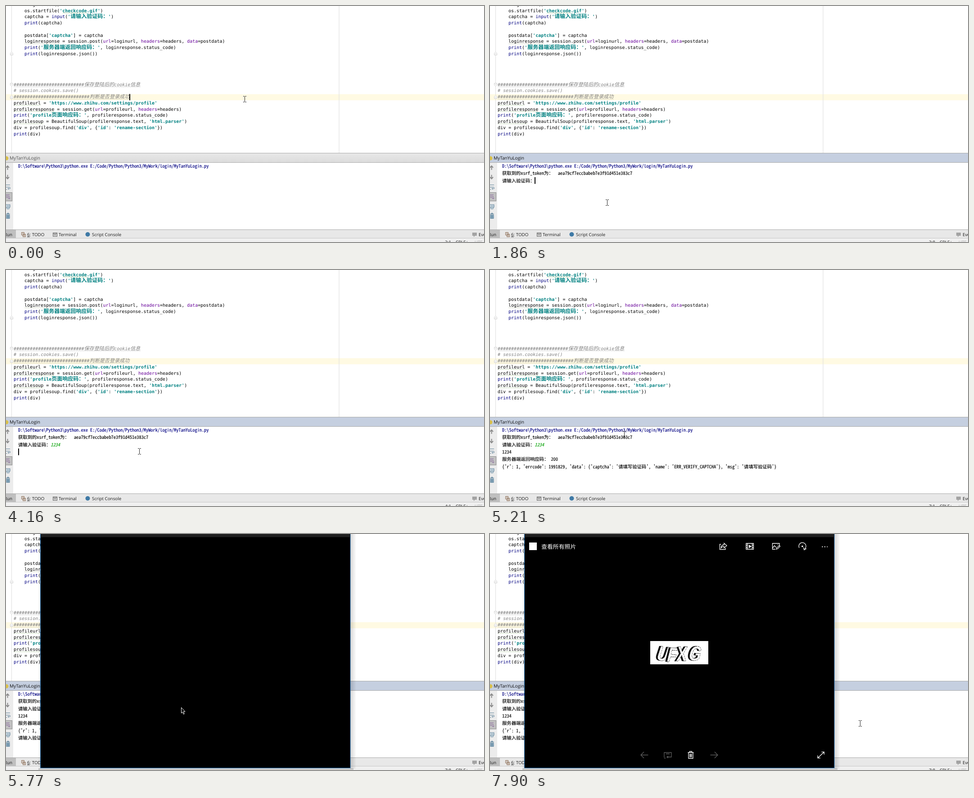
Write an HTML page that moves like this. It is 1062x527 px and loops after 8000 ms.

```html
<!DOCTYPE html>
<html lang="zh">
<head>
<meta charset="utf-8">
<title>Login run</title>
<style>
html, body { margin: 0; width: 100%; height: 100%; overflow: hidden; background: #fff; }
svg { display: block; width: 1062px; height: 527px; }
text { white-space: pre; text-rendering: geometricPrecision; }
.code { font: 10px 'DejaVu Sans Mono', monospace; fill: #000; }
.n { fill: #000080; }
.p { fill: #660099; }
.s { fill: #008080; font-weight: bold; }
.c { fill: #808080; font-style: italic; }
.han { font-family: 'Noto Sans CJK SC', 'Noto Sans CJK', sans-serif; font-size: 12px; }
.c.han { font-size: 11.1px; }
.out { font: 10.33px 'Noto Sans Mono CJK SC', 'Noto Sans CJK SC', monospace; fill: #000; stroke: #000; stroke-width: .15; }
.cmd { fill: #000080; stroke: #000080; }
.in { fill: #00a000; stroke: #00a000; font-style: italic; }
.ui { font: 9.8px 'Open Sans', sans-serif; fill: #1c1c1c; }
.app { font: 12.9px 'Noto Sans CJK SC', 'Noto Sans CJK', sans-serif; fill: #fff; }
.line { fill: none; stroke-width: 1; }
.captcha { font: bold 42px 'Liberation Sans', sans-serif; }
</style>
</head>
<body>
<svg viewBox="0 0 1062 527">
  <defs>
    <linearGradient id="shade"><stop stop-color="#000" stop-opacity=".16"/><stop offset="1" stop-color="#000" stop-opacity=".02"/></linearGradient>
    <linearGradient id="idle" x2="0" y2="1"><stop stop-color="#e8e8e8"/><stop offset="1" stop-color="#dcdcdc"/></linearGradient>
  </defs>

  <!-- editor -->
  <rect width="1062" height="527" fill="#fff"/>
  <rect y="197" width="1062" height="13.5" fill="#fffae3"/>
  <path class="line" stroke="#dcdcdc" d="M12.5 0V328M740 0V328"/>
  <g id="folds" fill="#fff" stroke="#d0d0d0"></g>
  <g id="waves" class="line"></g>
  <g id="code"></g>
  <rect id="editCaret" x="274" y="196.500" width="2" height="14"/>

  <!-- tool window -->
  <rect id="head" y="328" width="1062" height="21"/>
  <path class="line" stroke="#a9a9a9" d="M0 328.5H1062M0 349.500H1062"/>
  <circle cx="1" cy="340" r="4.500" fill="#d9c04a"/>
  <text id="title" class="ui" x="8" y="343" style="font-size:10.1px">MyTanYuLogin</text>
  <rect y="350" width="16" height="150" fill="#ececec"/>
  <g class="line" stroke="#8c8c8c" style="stroke-width:2">
    <path d="M3.500 366V358M0 361L3.500 357L7 361M3.500 377V385M0 382L3.500 386L7 382"/>
  </g>
  <g class="line" stroke="#5b7f96">
    <path d="M0 399.500H9M0 404.500H8Q10 405 9 408H4M6 406L4 408L6 410M0 409.500H2"/>
    <rect x="-4.500" y="416.500" width="18" height="19" fill="#c2c2c2" stroke="#8e8e8e"/>
    <path stroke="#8a6a9c" d="M0 421.500H8M0 424.500H6M0 427.500H5M7 424V431M4.500 428.500L7 431L9.500 428.500"/>
    <path fill="#dce6ec" d="M0 443.500H9V449.500H0M1 446.500H8M2 449.500V453H7V449.500"/>
    <path fill="#8fb0c4" d="M0 464.500H9M3 464V462.500H6V464M1 466.500H8V474.500H1ZM3.500 468V473M5.500 468V473"/>
  </g>
  <g id="console"></g>
  <rect id="caret" width="2" height="15"/>

  <!-- bottom bars -->
  <rect y="500" width="1062" height="19" fill="#e8e8e8"/>
  <rect y="500" width="22" height="19" fill="#bfbfbf"/>
  <rect y="519" width="1062" height="8" fill="#f0f0f0"/>
  <path class="line" stroke="#aaa" d="M0 499.500H1062"/>
  <path class="line" stroke="#c6c6c6" d="M0 518.500H1062"/>
  <g class="ui">
    <text x="-4" y="514">Run</text>
    <text x="47" y="514"><tspan text-decoration="underline">6</tspan>: TODO</text>
    <text x="117" y="514">Terminal</text>
    <text x="191" y="514">Script Console</text>
    <text x="1050" y="514">Event Log</text>
    <text id="status" x="989" y="531" text-anchor="end"></text>
    <text x="999" y="531">CRLF÷</text>
    <text x="1041" y="531" style="fill:#aaa">UTF-8</text>
  </g>
  <path class="line" stroke="#8b6b52" fill="#e6d3bd" d="M34.500 505.500H40.500V511.500H34.500ZM36 507.500H39M37.500 509.500H43.500V515.500H37.500ZM39 511.500H42M39 513.500H42"/>
  <rect x="104.500" y="506.500" width="9" height="8" fill="#d4d4d4" stroke="#666"/>
  <path class="line" stroke="#666" d="M105 508.500H113M106.500 511H111"/>
  <circle cx="181.500" cy="510" r="5" fill="#3f7aa6"/>
  <path fill="#a3a3a3" d="M1036 506H1046V513H1042L1039 516V513H1036Z"/>

  <!-- image viewer -->
  <g id="viewer">
    <rect x="765" width="12" height="524" fill="url(#shade)"/>
    <rect x="72" y="523" width="700" height="4" opacity=".16"/>
    <rect x="73" width="3" height="523" opacity=".06"/>
    <rect x="76.500" y="-2" width="688.500" height="524.500" stroke="#1f6fb5"/>
    <rect id="bar" x="77" width="687.500" height="7"/>
    <g id="tools">
      <rect x="87" y="19" width="17" height="17" fill="#fff"/>
      <text class="app" x="114" y="32.500">查看所有照片</text>
      <g class="line" stroke="#fff" style="stroke-width:1.300">
        <path d="M513 23H510.500V34.500H523V31M513.500 31Q514 24 520 24V20.500L526 26L520 31V28Q516 27.500 513.500 31Z"/>
        <path d="M569 21H585.500V34H569ZM572 21V34M582.500 21V34M569 25H572M569 30H572M582.500 25H585.500M582.500 30H585.500"/>
        <path fill="#fff" d="M575.500 25V30.500L580 27.700Z"/>
        <path d="M643 26V21H627.500V34H634M628 31L632 26L636 30M639 24H640M636 34L637 31L643 25.500L644.500 27.500L639 33Z"/>
        <path d="M687 31A8 8 0 1 1 699 33.500M703 32.500L698 35.500L696.500 30"/>
        <circle cx="694" cy="27.500" r="1.200" fill="#fff"/>
        <path stroke-dasharray="2 3.500" style="stroke-width:2" d="M737.500 28.500H750"/>
        <path d="M439.500 488H452.500M443.500 487.500V485.500H448.500V487.500M441 488V501H451V488M444 491V498.500M446 491V498.500M448 491V498.500"/>
        <path d="M728.500 500L742 487M736.500 486.700H742.300V492.500M728.200 494.500V500.300H734"/>
        <path stroke="#5c5c5c" d="M335 493.500H351.500M342 486.500L335 493.500L342 500.500M489.500 493.500H506M499 486.500L506 493.500L499 500.500M387 499V488H403V498H393M396 495.500L393 498L396 500.500M387 500.500H390M391 491H399"/>
      </g>
    </g>
    <g id="picture"><rect x="356" y="239" width="129" height="52" fill="#fff"/></g>
  </g>

  <g id="mouse">
    <path id="beam" class="line" stroke="#222" d="M-3 -6.500H-.5L.5 -5.500L1.500 -6.500H4M.5 -5.500V5.500M-3 6.500H-.5L.5 5.500L1.500 6.500H4"/>
    <path id="arrow" stroke="#fff" d="M.5 .5V13L3.200 10.500L5.400 15.500L7.300 14.600L5.100 9.700H9Z"/>
  </g>
</svg>
<script>
const $ = id => document.getElementById(id);
const show = (node, on) => node.setAttribute('display', on ? 'inline' : 'none');

function add(parent, tag, attrs, text = '') {
  const node = document.createElementNS('http://www.w3.org/2000/svg', tag);
  for (const key in attrs) node.setAttribute(key, attrs[key]);
  node.textContent = text;
  parent.appendChild(node);
  return node;
}

// Editor rows: alternating style and text, laid on a column grid
const column = 6.02;
const base = row => 13.6 + row * 13.75;
function line(row, x, ...parts) {
  for (let i = 0; i < parts.length; i += 2) {
    const style = parts[i];
    for (const run of parts[i + 1].match(/[\u3000-\uffef]+|[^\u3000-\uffef]+/g)) {
      const han = run > '\u3000';
      add($('code'), 'text', { class: `code ${style} ${han ? 'han' : ''}`, x, y: base(row) }, run);
      x += run.length * (han ? (style === 'c' ? 11.1 : 12) : column);
    }
  }
}

line(-1, 41, '', 'image.close()');
line(0, 41, '', 'os.startfile(', 's', "'checkcode.gif'", '', ')');
line(1, 41, '', 'captcha = ', 'n', 'input', '', '(', 's', "'请输入验证码：'", '', ')');
line(2, 41, 'n', 'print', '', '(captcha)');
line(4, 41, '', 'postdata[', 's', "'captcha'", '', '] = captcha');
line(5, 41, '', 'loginresponse = session.post(', 'p', 'url', '', '=loginurl, ',
  'p', 'headers', '', '=headers, ', 'p', 'data', '', '=postdata)');
line(6, 41, 'n', 'print', '', '(', 's', "'服务器端返回响应码：'", '', ', loginresponse.status_code)');
line(7, 41, 'n', 'print', '', '(loginresponse.json())');
line(12, 17, 'c', '#'.repeat(26) + '保存登陆后的cookie信息');
line(13, 17, 'c', '# session.cookies.save()');
line(14, 17, 'c', '#'.repeat(28) + '判断是否登录成功');
line(15, 17, '', 'profileurl = ', 's', "'https://www.zhihu.com/settings/profile'");
line(16, 17, '', 'profileresponse = session.get(', 'p', 'url', '', '=profileurl, ', 'p', 'headers', '', '=headers)');
line(17, 17, 'n', 'print', '', '(', 's', "'profile页面响应码：'", '', ', profileresponse.status_code)');
line(18, 17, '', 'profilesoup = BeautifulSoup(profileresponse.text, ', 's', "'html.parser'", '', ')');
line(19, 17, '', 'div = profilesoup.find(', 's', "'div'", '', ', {', 's', "'id'", '', ': ', 's', "'rename-section'", '', '})');
line(20, 17, 'n', 'print', '', '(div)');

function wave(row, x, end, stroke) {
  const y = base(row) + 2.5;
  let d = `M${x} ${y}`;
  for (let up = 1; x < end; up = 1 - up) d += `L${x += 2} ${y - up}`;
  add($('waves'), 'path', { d, stroke, 'stroke-width': .7 });
}
wave(0, 126, 180, '#9fc48f');
wave(5, 41, 119, '#c3c9b0');
wave(12, 17, 299, '#c6c6c6');
wave(14, 17, 275, '#cdcab4');
wave(15, 17, 77, '#b5cfa4');
wave(16, 17, 107, '#b5cfa4');
wave(18, 17, 83, '#b5cfa4');

// Fold marks point down where a block opens and up where it closes
for (const [y, dir] of [[106.5, -1], [175.5, 1], [203.5, -1]])
  add($('folds'), 'path', { d: `M9.500 ${y - 3 * dir}H15.500V${y + dir}L12.500 ${y + 4 * dir}L9.500 ${y + dir}ZM11 ${y}H14` });

// Console rows and the time each appears
const rowY = row => 361 + row * 16.35;
const output = [
  [0, 'D:\\Software\\Python3\\python.exe E:/Code/Python/Python3/MyWork/login/MyTanYuLogin.py'],
  [620, '获取到的xsrf_token为：  aea79cf7eccbabeb7e3f91d451e383c7'],
  [620, '请输入验证码：'],
  [4410, '1234'],
  [5090, '服务器端返回响应码： 200'],
  [5090, "{'r': 1, 'errcode': 1991829, 'data': {'captcha': '请填写验证码', 'name': 'ERR_VERIFY_CAPTCHA'}, 'msg': '请填写验证码'}"],
  [5360, '请输入验证码：']
].map(([at, text], row) => ({
  at, node: add($('console'), 'text', { class: row ? 'out' : 'out cmd', x: 27, y: rowY(row) }, text)
}));
const typed = add($('console'), 'text', { class: 'out in', x: 99.3, y: rowY(2) });

// Hollow slanted letters with a thick dark left side
[['U', 368, 281, 8], ['F', 391, 285, 4], ['X', 413, 284, -2], ['G', 439, 281, 6]].forEach(([ch, x, y, turn]) => {
  const g = add($('picture'), 'g', { class: 'captcha', transform: `translate(${x} ${y}) rotate(${turn}) skewX(-10) scale(.8 1.1)` });
  for (let dx = -5; dx < 0; dx++) add(g, 'text', { x: dx, y: 0, fill: '#111' }, ch);
  add(g, 'text', { x: 0, y: 0, fill: '#fff', stroke: '#111', 'stroke-width': .7, 'stroke-dasharray': '4 1.5' }, ch);
});

// The screen refreshes in bursts: start, end, number of steps
const steps = [0];
for (const [from, to, n] of [
  [150, 1080, 7], [1210, 2250, 9], [2370, 3300, 8], [3450, 3730, 3], [4160, 4410, 2],
  [5090, 5090, 1], [5210, 5360, 2], [5640, 6570, 8], [6700, 7630, 8], [7780, 7900, 2]
]) for (let i = 0; i < n; i++) steps.push(Math.floor((from + (to - from) * i / (n - 1 || 1)) / 10) * 10);

const path = [
  [0, 530, 208], [150, 530, 205], [1080, 505, 176], [1860, 260, 439], [2250, 260, 439],
  [3030, 281, 415], [3300, 292, 412], [3730, 296, 405], [4410, 296, 405], [5090, 297, 385],
  [5210, 298, 367], [5360, 389, 387], [5770, 389, 387], [6570, 442, 300], [6700, 440, 297],
  [7000, 468, 269], [7630, 689, 367], [7780, 758, 398], [7900, 822, 423]
];
function pointer(t) {
  const i = path.findIndex(key => key[0] >= t);
  const [t1, x1, y1] = path[i], [t0, x0, y0] = path[Math.max(0, i - 1)];
  const k = t1 > t0 ? (t - t0) / (t1 - t0) : 1;
  return [Math.round(x0 + (x1 - x0) * k), Math.round(y0 + (y1 - y0) * k)];
}

const keys = [2500, 2760, 3030, 3300];
function status(t, count) {
  if (t < 620) return '2:1';
  if (t < 4160) return '3:' + (8 + count);
  return t < 4410 ? '4:1' : t < 5090 ? '5:1' : t < 5360 ? '7:1' : '7:8';
}

function draw(ms) {
  const t = steps.filter(s => s <= ms).pop();
  const focus = t >= 1730, open = t >= 5360;
  const count = keys.filter(k => k <= t).length;

  show($('editCaret'), t < 150 || (t >= 620 && t < 1210));
  $('head').setAttribute('fill', focus ? '#c5cfe0' : 'url(#idle)');
  $('title').style.fill = focus ? '#111' : '#555';
  for (const row of output) show(row.node, t >= row.at);
  typed.textContent = '1234'.slice(0, count);
  $('status').textContent = status(t, count);

  const row = t < 4160 ? 2 : t < 4410 ? 3 : 4;
  show($('caret'), (focus && t < 3730) || (t >= 4160 && t < 5090));
  $('caret').setAttribute('x', row === 2 ? 99 + count * 5.17 : 27);
  $('caret').setAttribute('y', rowY(row) - 11.5);

  show($('viewer'), open);
  $('bar').setAttribute('fill', t < 5640 ? '#fff' : '#1f1f1f');
  show($('tools'), t >= 6030);
  show($('picture'), t >= 6300);

  const [x, y] = pointer(t);
  const arrow = open && x < 765;
  show($('arrow'), arrow);
  show($('beam'), !arrow);
  $('mouse').setAttribute('transform', `translate(${x} ${y})`);
}

let start;
function tick(now) {
  start ??= now;
  draw((now - start) % 8000);
  requestAnimationFrame(tick);
}
draw(0);
requestAnimationFrame(tick);
</script>
</body>
</html>
```
